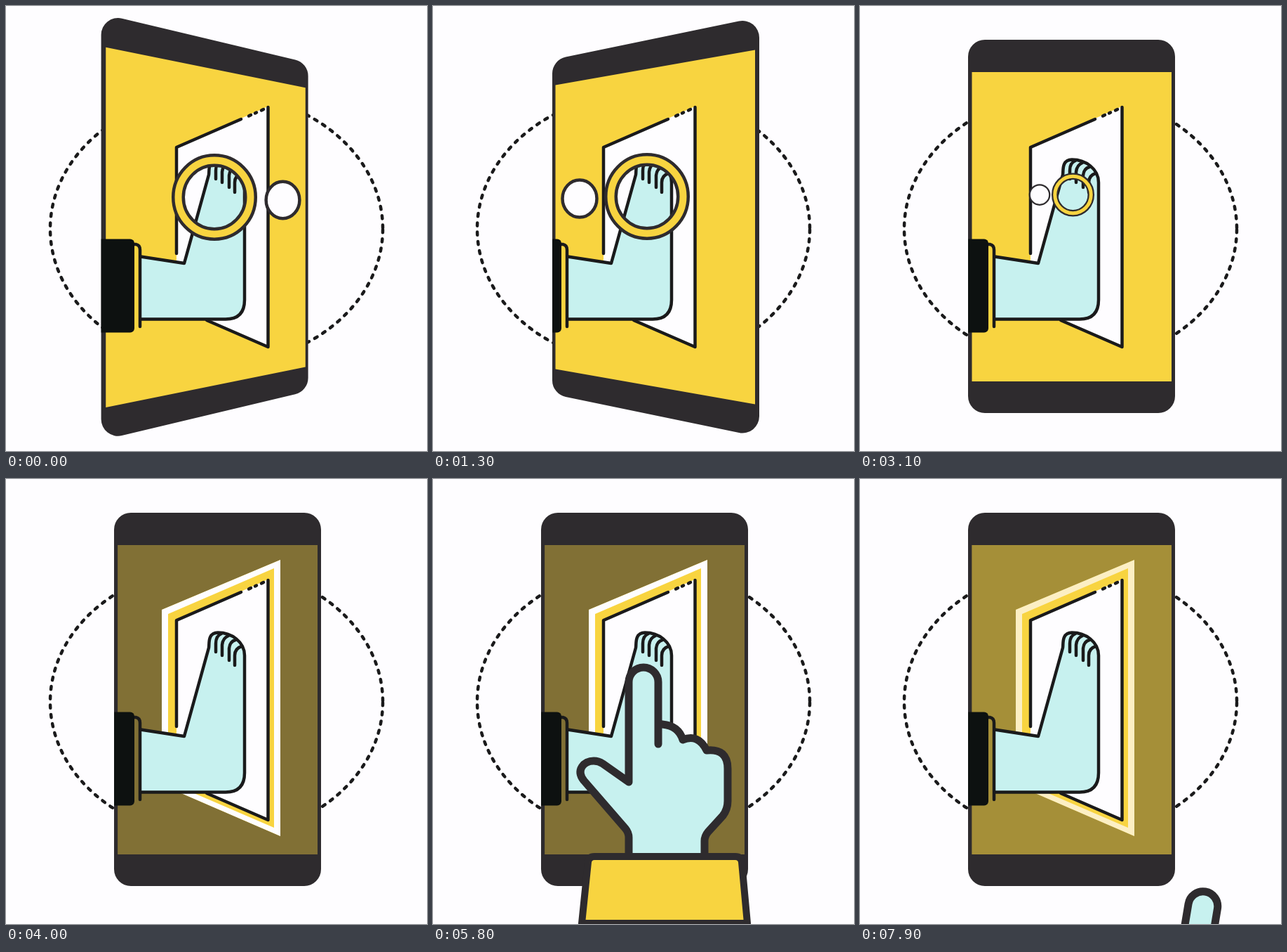
These frames come from a looping animation (600 px wide and 633 px high, 8000 ms). An HTML page with a canvas:

```html
<!DOCTYPE html>
<html lang="en">
<head>
<meta charset="utf-8">
<title>Foot in the door</title>
<style>
html, body { margin: 0; width: 100%; height: 100%; overflow: hidden; background: #fefdff; }
canvas { display: block; }
</style>
</head>
<body>
<canvas id="stage" width="600" height="633"></canvas>
<script>
const ctx = document.getElementById('stage').getContext('2d');
const LOOP = 8000, STEP = 100;
const DARK = '#2e2b2e', INK = '#1a1a1b', YELLOW = '#f8d440', WHITE = '#fefdff', SKIN = '#c7f1ef';

const shape = {
  glow: new Path2D('M222 186L391 115V508L222 435Z'),
  rim: new Path2D('M231 192L382 127V496L231 431Z'),
  door: new Path2D('M243 201L373 143V485L243 428Z'),
  doorLine: new Path2D('M243 352V201L335 161M346 156.500L349 155M355 152.500L357 151.500M364 148.500L367 147M373.500 144V485L286 447'),
  foot: new Path2D('M192 356.500L254 366L289 240C290 234 287 219 302 218.500C322 218.500 340 232 340 251V418Q340 445.500 313 445.500H192'),
  toes: new Path2D('M299 246V234Q299 223 307 220M308 251V236Q309 226 317 223M318 258V241Q319 231 327 229M326 265V251Q326 241 336 238'),
  strap: new Path2D('M183 339H185Q191 340 191 347V456'),
  palm: new Path2D('M279 545V510Q279 503 274 497L215 429C203 414 215 401 229 401Q236 401 242 405L279 431V289A21 21 0 0 1 321 289V349H327Q350 351 356 371Q378 362 390 386Q420 383 420 412V458Q420 470 413 479L392 502Q387 508 387 515V545'),
  palmLine: new Path2D('M279 545V510Q279 503 274 497L215 429C203 414 215 401 229 401Q236 401 242 405L279 431V289A21 21 0 0 1 321 289V377M327 349Q350 351 356 371Q378 362 390 386Q420 383 420 412V458Q420 470 413 479L392 502Q387 508 387 515V545'),
  cuff: new Path2D('M212 632L221 545Q222 537 230 537H431Q439 537 440 545L448 632Z')
};

const mix = (a, b, p) => a + (b - a) * p;

// Sine ease from 0 to 1 between two times.
function ease(t, from, to) {
  const p = Math.min(1, Math.max(0, (t - from) / (to - from)));
  return (1 - Math.cos(Math.PI * p)) / 2;
}

function fill(path, color, alpha = 1) {
  ctx.globalAlpha = alpha;
  ctx.fillStyle = color;
  ctx.fill(path);
  ctx.globalAlpha = 1;
}

function line(path, color, width) {
  ctx.strokeStyle = color;
  ctx.lineWidth = width;
  ctx.stroke(path);
}

function ellipse(x, y, rx, ry) {
  const path = new Path2D();
  path.ellipse(x, y, rx, ry, 0, 0, 2 * Math.PI);
  return path;
}

// Upright panel whose left and right edges grow or shrink with the tilt.
function panel(left, right, top, bottom, skew, radius) {
  const path = new Path2D();
  const pts = [[left, top + skew], [right, top - skew], [right, bottom + skew], [left, bottom - skew]];
  path.moveTo((left + right) / 2, top);
  for (let i = 1; i <= 4; i++) path.arcTo(...pts[i % 4], ...pts[(i + 1) % 4], radius);
  path.closePath();
  return path;
}

function drawOrbit() {
  ctx.setLineDash([4.3, 9.04]);
  ctx.lineDashOffset = -1;
  line(ellipse(300, 317, 237, 193), INK, 4.5);
  ctx.setLineDash([]);
}

function drawPhone(tilt, dim) {
  const size = Math.abs(tilt), lift = Math.min(1, 4 * size);
  const left = 154 + 16 * tilt, right = left + 295;
  fill(panel(left, right, 48 - 2 * size, 579 + 3.5 * size, 30.5 * tilt, 24), DARK);
  const screen = panel(left + 5.5 - tilt, right - 5 - tilt,
    94 - 6.5 * lift, 534 + 2.5 * lift + 5 * size, 25 * tilt, 0);
  fill(screen, YELLOW);
  if (dim > 0) {
    fill(screen, DARK, 0.59 * dim);
    fill(shape.glow, YELLOW);
    fill(shape.glow, WHITE, dim);
    fill(shape.rim, YELLOW);
  }
  return left;
}

function drawLeg(edge) {
  fill(shape.door, WHITE);
  line(shape.doorLine, INK, 4.5);
  fill(shape.foot, SKIN);
  line(shape.foot, INK, 4.5);
  line(shape.toes, INK, 4.5);
  line(shape.strap, INK, 4.5);
  const sleeve = new Path2D();
  sleeve.roundRect(edge, 331.5, 183 - edge, 133, [0, 6, 6, 0]);
  fill(sleeve, '#0d1110');
}

function drawRing(swing, back, tilt, scale) {
  if (scale <= 0) return;
  const size = Math.abs(tilt);
  const ring = ellipse(mix(mix(297, 305, swing), 303.5, back), mix(mix(272, 271, swing), 268.5, back),
    51.5 * scale, 52.5 * scale);
  line(ring, DARK, 19 * scale);
  line(ring, YELLOW, 10 * scale);
  const ball = ellipse(mix(mix(394.5, 209, swing), 256, back), mix(mix(276, 274, swing), 268.5, back),
    (28.5 - 4 * size) * scale, (28.5 - 2 * size) * scale);
  fill(ball, WHITE);
  line(ball, DARK, 4.5 * scale);
}

function drawHand(away) {
  if (away >= 1) return;
  ctx.save();
  ctx.translate(300 + 222 * away, 263 + 367 * away);
  ctx.rotate(0.19 * away);
  ctx.translate(-300, -263);
  fill(shape.palm, SKIN);
  line(shape.palmLine, DARK, 11);
  fill(shape.cuff, YELLOW);
  line(shape.cuff, DARK, 10);
  ctx.restore();
}

function draw(t) {
  const swing = ease(t, 0, 1300), back = ease(t, 1300, 2950);
  const tilt = mix(mix(-1.15, 1, swing), 0, back);
  const dim = ease(t, 3200, 3600) * (1 - ease(t, 7750, 8150));
  ctx.fillStyle = WHITE;
  ctx.fillRect(0, 0, 600, 633);
  drawOrbit();
  drawLeg(drawPhone(tilt, dim));
  drawRing(swing, back, tilt, 1 - ease(t, 2900, 3300));
  drawHand(1 - ease(t, 4200, 5100) + ease(t, 7250, 8100));
}

ctx.lineCap = ctx.lineJoin = 'round';
const start = performance.now();
function tick() {
  const t = (performance.now() - start) % LOOP;
  draw(Math.floor(t / STEP) * STEP);
  requestAnimationFrame(tick);
}
tick();
</script>
</body>
</html>
```
